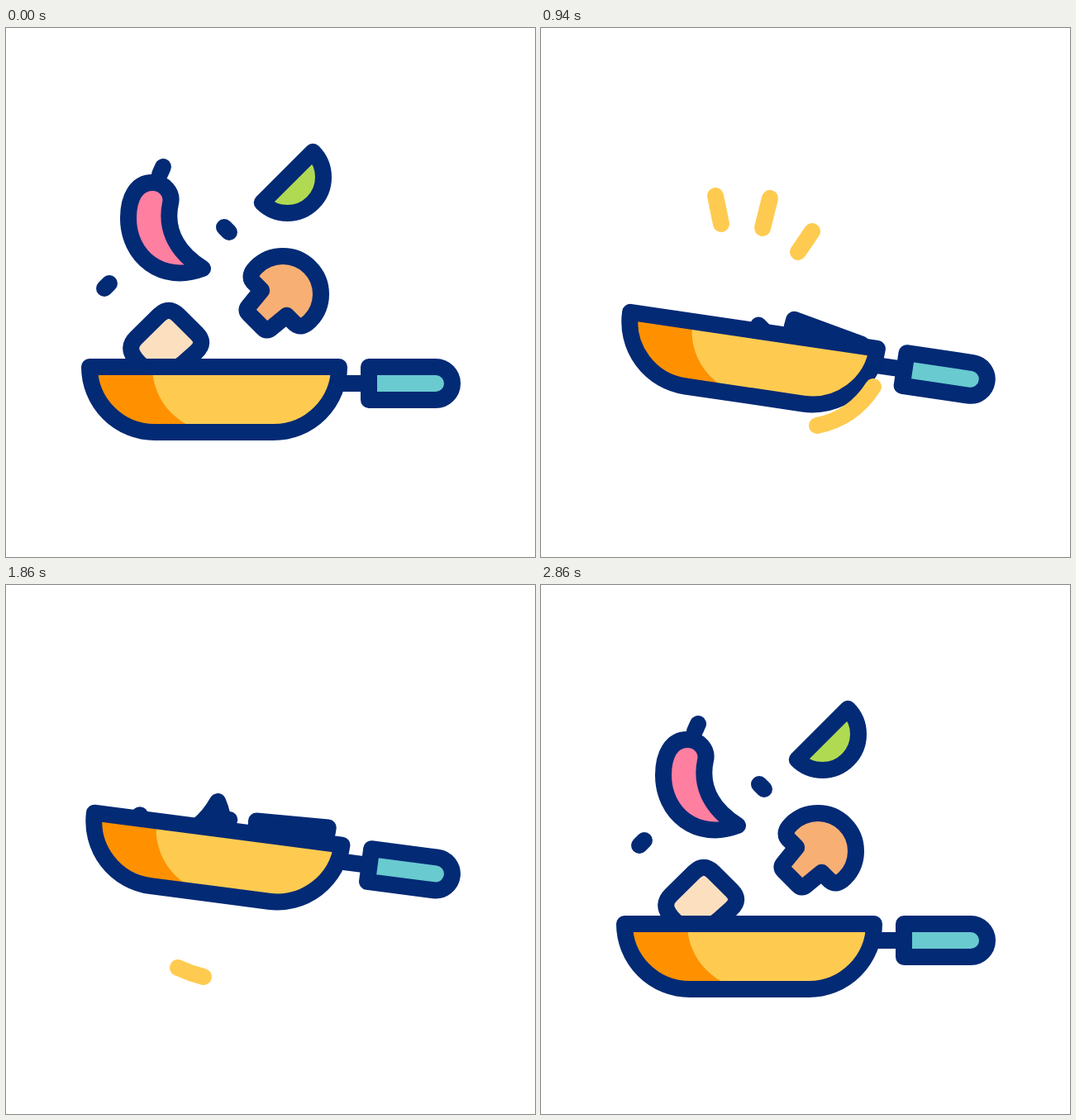
Recreate the animation shown at these times as an HTML page. Size 640 by 640 pixels, loop 3040 ms.

```html
<!DOCTYPE html>
<html lang="en">
<head>
<meta charset="utf-8">
<title>Tossing pan</title>
<style>
  html, body { margin: 0; width: 100%; height: 100%; overflow: hidden; background: #fff; }
  svg { display: block; width: 100vw; height: 100vh; }
  .line { stroke: #032a75; stroke-width: 20; stroke-linecap: round; stroke-linejoin: round; fill: none; }
  .glow { stroke: #fecb50; stroke-width: 20; stroke-linecap: round; fill: none; }
</style>
</head>
<body>
<svg viewBox="0 0 640 640">
  <defs>
    <clipPath id="above"><rect id="rim" x="-300" y="-600" width="1300" height="1010"/></clipPath>
    <path id="bowl" d="M101 410A79 79 0 0 0 180 489H324A79 79 0 0 0 403 410Z"/>
  </defs>

  <g clip-path="url(#above)">
    <g id="cube"><path class="line" style="fill:#fcdfbf"/></g>
    <g id="chili">
      <path class="line" d="M10-33L14-42"/>
      <path class="line" style="fill:#ff7fa1"
        d="M62 81C12 100-28 66-28 20C-28-5-18-23 1-23C16-23 26-10 23 2C16 35 32 62 62 81Z"/>
    </g>
    <g id="mushroom"><path class="line" style="fill:#f7af74"
      d="M-21.5 15H-36Q-46 14-46 0A46 46 0 0 1 46 0Q46 14 36 15H21.5L19 40Q18.5 46 12.5 46H-12.5Q-18.5 46-19 40Z"/></g>
    <g id="lime"><path class="line" style="fill:#b0da52" d="M-43.5 0H43.5A43.5 43.5 0 0 1-43.5 0Z"/></g>
    <g id="crumbA"><path class="line" d="M-4.2 0H4.2"/></g>
    <g id="crumbB"><path class="line" d="M-4.2 0H4.2"/></g>
  </g>

  <g id="pan">
    <path class="line" style="stroke-linecap:butt" d="M400 430H440"/>
    <use href="#bowl" fill="#fecb50"/>
    <path fill="#ff9100" d="M101 410A79 79 0 0 0 180 489H256A79 79 0 0 1 177 410Z"/>
    <use href="#bowl" class="line"/>
    <path class="line" style="fill:#69cad0" d="M439 410H520A20 20 0 0 1 520 450H439Z"/>
  </g>

  <g id="glows"></g>
</svg>

<script>
const LOOP = 3040, STEP = 20, PIVOT = { x: 385, y: 438 }, RIM = 410;
const $ = id => document.getElementById(id);
const clamp = v => Math.max(0, Math.min(1, v));
const mix = (a, b, k) => a + (b - a) * k;

// Polygon with softened corners
function softPoly(pts, r) {
  const toward = (a, b) => {
    const k = r / Math.hypot(b[0] - a[0], b[1] - a[1]);
    return [mix(a[0], b[0], k), mix(a[1], b[1], k)];
  };
  return pts.map((p, i) => {
    const prev = pts.at(i - 1), next = pts[(i + 1) % pts.length];
    return `${i ? 'L' : 'M'}${toward(p, prev)}Q${p} ${toward(p, next)}`;
  }).join('') + 'Z';
}
$('cube').firstElementChild.setAttribute('d',
  softPoly([[-35, -27], [-7, -48], [43, 3], [-2, 48], [-37, 9]], 16));

// Smooth curve through [time, value] points, flat at turning points
function curve(points) {
  const last = points.length - 1;
  const slope = i => (points[i + 1][1] - points[i][1]) / (points[i + 1][0] - points[i][0]);
  const tangent = i => {
    if (i === 0 || i === last) return 0;
    const a = slope(i - 1), b = slope(i);
    return a * b <= 0 ? 0 : 2 * a * b / (a + b);
  };
  return t => {
    const next = points.findIndex(p => p[0] > t);
    if (next < 1) return points[next ? last : 0][1];
    const i = next - 1, [t0, v0] = points[i], [t1, v1] = points[next];
    const h = t1 - t0, u = (t - t0) / h, w = 1 - u;
    return w * w * ((1 + 2 * u) * v0 + u * h * tangent(i))
         + u * u * ((3 - 2 * u) * v1 - w * h * tangent(next));
  };
}
const tilt = curve([[220, 0], [620, 14], [940, 8.4], [1140, -8], [1320, -5.9],
                    [1860, 7.4], [2240, -9], [2860, 0]]);
const lift = curve([[220, 0], [620, -82], [940, -25], [1140, 17], [1320, -6],
                    [1860, -98], [2240, 27], [2860, 0]]);

// Height of the tilted rim above a given x
function rimY(x, t) {
  const a = tilt(t) * Math.PI / 180, r = PIVOT.y - RIM;
  return PIVOT.y + lift(t) - r * Math.cos(a) + (x - PIVOT.x - r * Math.sin(a)) * Math.tan(a);
}

// home and air: x, y, turn; pan: x, depth below the rim, turn on each catch
const food = {
  cube:     { home: [194, 379, -90],     air: [193, 277, 6],      pan: [193, 70, -45, -49] },
  chili:    { home: [176, 210, 0],       air: [178, 203, -102],   pan: [178, 80, -50, -92] },
  mushroom: { home: [335, 322, 45],      air: [337, 270, -35],    pan: [336, 80, 10, 35] },
  lime:     { home: [340.5, 180.5, -45], air: [341, 147.5, -45],  pan: [348, 25, 21.5, 8] },
  crumbA:   { home: [122, 312, -45],     air: [155.5, 153, -45],  pan: [160, 37, -45, -45] },
  crumbB:   { home: [267, 244, 45],      air: [266.5, 124, 73],   pan: [266, 35, 45, 1] }
};

const rise = (t, start, end) => Math.sin(clamp((t - start) / (end - start)) * Math.PI / 2);
const fall = (t, start, end) => Math.cos(clamp((t - start) / (end - start)) * Math.PI / 2);

// Drop in, toss up, drop in, toss back; the last toss frees the left side first
function foodPose({ home, air, pan }, t) {
  const [x, depth, turn1, turn2] = pan;
  const lead = (340 - home[0]) * .4;
  const free = t < 890 ? fall(t, 220, 600)
    : t < 1440 ? rise(t, 890, 1440)
    : t < 1940 ? fall(t, 1440, 1933)
    : rise(t, 2020 - lead, 2720 - lead);
  const out = t < 890 || t >= 1940 ? home : air;
  return [
    mix(x, out[0], free),
    mix(rimY(x, t) + depth, out[1], free),
    mix(t < 1440 ? turn1 : turn2, out[2], free * free)
  ];
}

// Strokes that draw on, then wipe off
const glows = [
  [520, 'M164 425Q195 453 231 468'],
  [840, 'M334 481Q378 472 402 434'],
  [840, 'M218 237L211 203'],
  [840, 'M268 242L277 206'],
  [840, 'M311 271L328 246'],
  [1220, 'M419 432Q431 414 435 393'],
  [1760, 'M208 463Q223 470 239 474']
].map(([start, d]) => {
  const el = document.createElementNS('http://www.w3.org/2000/svg', 'path');
  el.setAttribute('class', 'glow');
  el.setAttribute('d', d);
  $('glows').append(el);
  return { el, start, len: el.getTotalLength() };
});

function draw(t) {
  const move = `translate(0 ${lift(t)}) rotate(${tilt(t)} ${PIVOT.x} ${PIVOT.y})`;
  $('pan').setAttribute('transform', move);
  $('rim').setAttribute('transform', move);

  for (const id in food) {
    const [x, y, turn] = foodPose(food[id], t);
    $(id).setAttribute('transform', `translate(${x} ${y}) rotate(${turn})`);
  }

  for (const { el, start, len } of glows) {
    const head = clamp((t - start) / 80), tail = clamp((t - start - 120) / 80);
    el.style.display = head > tail ? '' : 'none';
    el.style.strokeDasharray = `${(head - tail) * len + .1} ${len * 2}`;
    el.style.strokeDashoffset = -tail * len;
  }
}

const begin = performance.now();
function tick() {
  const t = (performance.now() - begin) % LOOP;
  draw(Math.floor(t / STEP) * STEP);
  requestAnimationFrame(tick);
}
tick();
</script>
</body>
</html>
```
